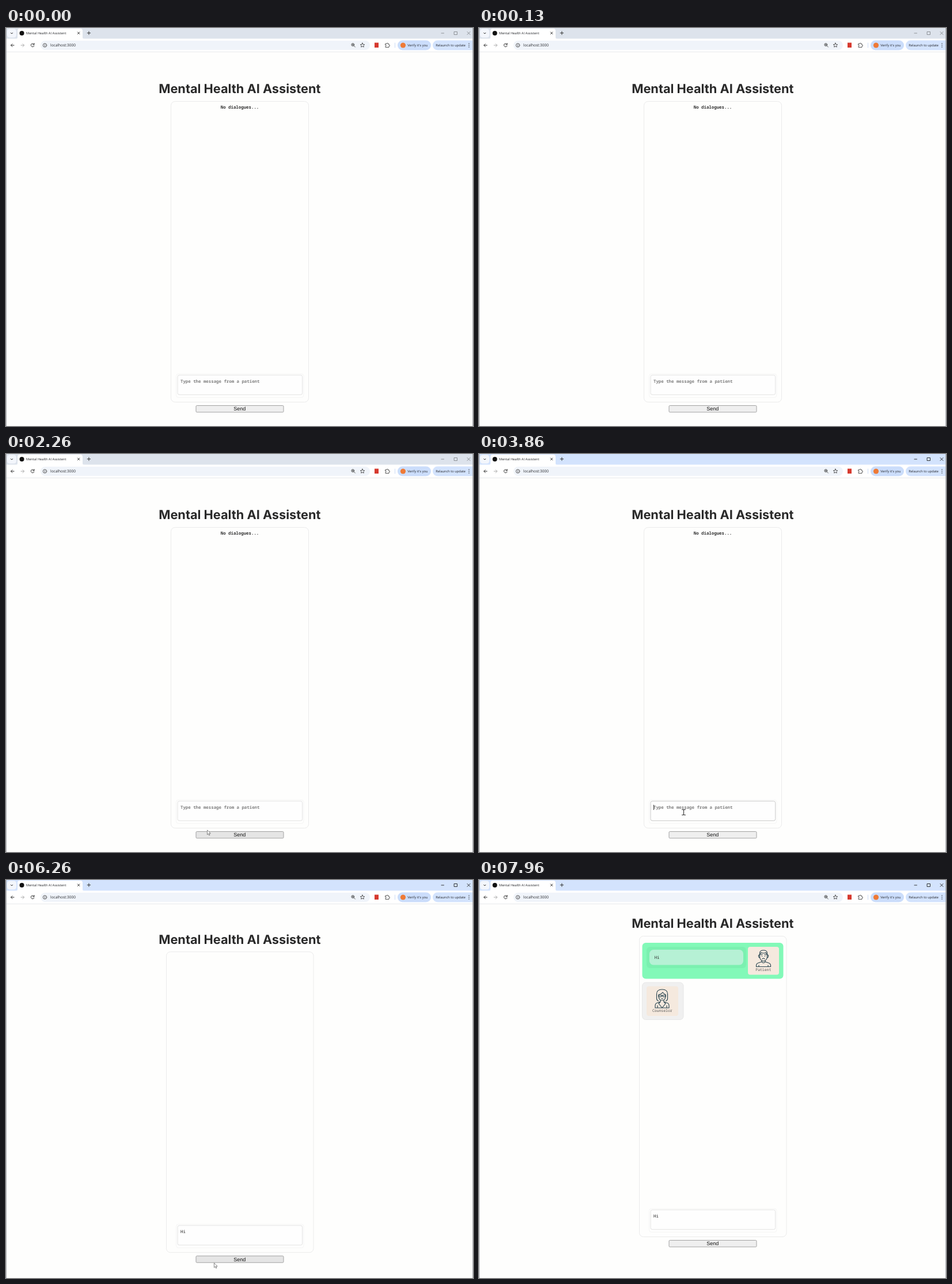
An HTML page for the animation above (8000 ms loop, 811 by 691 pixels).

```html
<!DOCTYPE html>
<html lang="en">
<head>
<meta charset="utf-8">
<title>Mental Health AI Assistent</title>
<style>
  html, body { margin: 0; width: 100%; height: 100%; overflow: hidden; background: #fefefd; }
  svg { display: block; width: 811px; height: 691px; text-rendering: geometricPrecision; }
  .ui { font: 5.7px "Open Sans", sans-serif; fill: #25272b; }
  .mono { font: 600 7.4px "Noto Sans Mono", monospace; fill: #333; }
  .label { font: 6.45px "Noto Sans Mono", monospace; fill: #555; text-anchor: middle; }
  .line { fill: none; stroke: #333; stroke-linecap: round; stroke-linejoin: round; }
  .portrait { fill: none; stroke: #294550; stroke-width: 1.15; stroke-linecap: round; stroke-linejoin: round; }
</style>
</head>
<body>
<svg viewBox="0 0 811 691">
  <rect width="811" height="691" fill="#fefefd"/>

  <g id="page">
    <text x="405.8" y="113.3" text-anchor="middle" font-family="Inter, sans-serif" font-weight="700" font-size="21.72" fill="#292929">Mental Health AI Assistent</text>
    <rect id="panel" y="127.5" height="522" rx="7" fill="none" stroke="#ebebeb"/>
    <text id="empty" class="mono" x="406" y="140" text-anchor="middle">No dialogues...</text>

    <g transform="translate(0 30)">
      <g id="patient">
        <rect x="283.5" y="109" width="245" height="62.5" rx="6" fill="#82f9b8"/>
        <g id="message">
          <rect x="291" y="116" width="173" height="37" rx="6" fill="#7bf0b0"/>
          <rect x="296" y="121" width="163" height="26.5" rx="7" fill="#b6f1d5"/>
          <text class="mono" x="304.7" y="136.7" style="font-weight:500">Hi</text>
          <rect x="467" y="116" width="54" height="48.5" rx="4" fill="#f5e9de"/>
          <g class="portrait">
            <path d="M487.5 130v-3q0-5 6.5-5t6.5 5v3M487.5 130q2-1 2-4 5 2 9 0 0 3 2 4"/>
            <path d="M487.5 130v4q1 6 6.5 7 5.5-1 6.5-7v-4M487 130q-2 0-1.5 2.5t2 2M501 130q2 0 1.5 2.5t-2 2"/>
            <path d="M490 130l2-.7M498 130l-2-.7M491.5 132v.4M496.5 132v.4M492 137q2-2 4 0"/>
            <path d="M491 140v2l-6 2q-3.5 1-3.5 5v1.500h25V149q0-4-3.5-5l-6-2v-2M491 142q3 4 6 0M486 148v2.500M502 148v2.500"/>
          </g>
          <text class="label" x="493.8" y="158">Patient</text>
        </g>
      </g>

      <g id="counselor">
        <rect x="283.5" y="178" width="71.5" height="64.5" rx="6" fill="#f0f0f0" stroke="#e7e7e7"/>
        <rect x="291" y="184.5" width="55" height="51.5" rx="4" fill="#f5e9de"/>
        <g class="portrait">
          <path d="M311.500 210q-3-1-3-4.500V198q0-8 9.500-8t9.500 8v7.500q0 3.500-3 4.500"/>
          <path d="M312 199q5-1 7-4 2 3 5 4M312 199v4q1 6 6 6t6-6v-4"/>
          <path d="M312 200h5v2q-2.5 2-5 0zM319 200h5v2q-2.5 2-5 0zM317 200.500h2M316.500 206h3"/>
          <path d="M315 208.500v3l-6 2q-3 1-3 5v3.500h24V218.500q0-4-3-5l-6-2v-3M315 211.500l-3 3 6 7.500 6-7.500-3-3M310 218v4M326 218v4"/>
        </g>
        <text class="label" x="318.3" y="228.8">Counselor</text>
      </g>
    </g>

    <rect x="295.5" y="600.5" width="221.5" height="41" rx="4" fill="none" stroke="#f5f5f5"/>
    <rect id="field" x="298" y="602.7" width="216.7" height="34" rx="3" fill="#fefefe"/>
    <text id="typed" class="mono" x="303" y="615.7"></text>
    <path id="caret" d="M0 609v9" stroke="#222" stroke-width=".9"/>
    <rect id="send" x="330" y="655.5" width="152" height="11.5" rx="1.5" stroke="#999" stroke-width=".9"/>
    <text x="405.8" y="664.4" text-anchor="middle" font-family="Liberation Sans, sans-serif" font-size="9" fill="#111">Send</text>
  </g>

  <g id="browser">
    <rect id="tabBar" width="811" height="22"/>
    <rect x="2" y="1.5" width="16" height="15" rx="4.5" fill="#f3f6fc"/>
    <path d="M17 19q3 0 3-3V5q0-4 4-4h105q4 0 4 4v11q0 3 3 3z" fill="#fff"/>
    <rect y="18.5" width="811" height="22.5" fill="#fff"/>
    <path d="M0 41.500h811" stroke="#e7e9ec"/>
    <rect x="60" y="22" width="572" height="16" rx="8" fill="#f0f4fa"/>
    <circle cx="27.5" cy="9" r="4" fill="#111"/>
    <text class="ui" x="35" y="11.2">Mental Health AI Assistent</text>
    <text class="ui" x="77" y="32.3" style="font-size:6.54px">localhost:3000</text>

    <g class="line">
      <path d="M8.300 8.300l1.700 1.700 1.700-1.700M124.300 7l3.600 3.600m0-3.600l-3.600 3.600M141.200 8.700h5.400m-2.700-2.700v5.400"/>
      <path d="M14 30H8.500m2.500-2.500L8.500 30l2.500 2.500"/>
      <path d="M26 30h5.500m-2.500-2.500l2.500 2.500-2.500 2.500" stroke="#aaa"/>
      <path d="M48.500 28a2.900 2.900 0 1 0 .4 3M49 26.500V29h-2.500"/>
      <g stroke-width=".8">
        <circle cx="67.5" cy="30" r="3.2"/>
        <path d="M67.500 29.800v1.700M67.500 28.300v.1"/>
        <circle cx="602.3" cy="29" r="2.4"/>
        <path d="M604.200 30.900l2.200 2.200M601.200 29h2.200M602.300 27.900v2.200"/>
        <path d="M619 26l1.100 2.400 2.600.3-1.900 1.800.5 2.600-2.300-1.300-2.300 1.300.5-2.600-1.900-1.800 2.600-.3z"/>
        <path d="M659 27.500h2q0-1.500 1-1.500t1 1.500h2v2q1.500 0 1.500 1t-1.500 1v2h-6v-2q1.300 0 1.300-1t-1.300-1z"/>
      </g>
      <path d="M675.500 26v8" stroke="#cddcf5"/>
      <path id="windowButtons" d="M756 9h4.500M778.500 6.500h5v5h-5zM801 6.500l5 5m0-5l-5 5" stroke-width=".9"/>
    </g>

    <rect x="640" y="25.5" width="7" height="8.5" fill="#d63a2f"/>
    <rect x="680" y="21.5" width="58" height="17" rx="8.5" fill="#cbddfb"/>
    <circle cx="689.5" cy="30" r="4.6" fill="#ee7a36"/>
    <text class="ui" x="697.3" y="32">Verify it's you</text>
    <path d="M749.500 21.500H811v17h-61.500a8.500 8.500 0 0 1 0-17z" fill="#d3e3fd"/>
    <text class="ui" x="746.3" y="32">Relaunch to update</text>
    <path d="M804 27v.1M804 30v.1M804 33v.1" class="line" stroke-width="1.5"/>
    <path d="M.5 0v691M810.500 0v691" stroke="#a5a8ac" stroke-width=".9"/>
  </g>

  <path id="arrow" d="M0 0V8L1.900 6.300 3.200 9.200 4.500 8.600 3.200 5.800H5.700Z" fill="#fff" stroke="#555" stroke-width=".7"/>
  <path id="beam" class="line" d="M-3-4.700h2L0-4 1-4.700h2M-3 4.700h2L0 4l1 .7h2M0-4v8" stroke-width="1.1"/>
  <rect id="blackout" width="811" height="691" fill="#010102"/>
</svg>

<script>
const LOOP = 8000, FOCUS = 2740, CLICK = 5730;
const el = Object.fromEntries([...document.querySelectorAll('[id]')].map(e => [e.id, e]));

// time, x, y
const pointerPath = [
  [1260, 748, 368], [1500, 600, 530], [1760, 449, 676], [2100, 449, 676],
  [2180, 400, 676], [2260, 349.5, 653], [2450, 353, 627], [2650, 354, 622],
  [2930, 354, 622], [2960, 355.5, 622], [5360, 355.5, 622], [5480, 360, 674],
  [5560, 360, 662], [5700, 360, 662], [6260, 360.5, 665], [6500, 581, 640],
  [7330, 635, 612], [7800, 801, 590], [7960, 815, 585]
];

const between = (t, a, b) => t >= a && t < b;
const ramp = (t, a, b) => {
  const p = Math.min(1, Math.max(0, (t - a) / (b - a)));
  return p * p * (3 - 2 * p);
};
const show = (e, on) => e.setAttribute('visibility', on ? 'visible' : 'hidden');
const set = (e, attrs) => { for (const k in attrs) e.setAttribute(k, attrs[k]); };

function pointerAt(t) {
  const i = pointerPath.findIndex(p => p[0] > t);
  if (i < 1) return pointerPath.at(i ? -1 : 0).slice(1);
  const [t0, x0, y0] = pointerPath[i - 1], [t1, x1, y1] = pointerPath[i];
  const p = (t - t0) / (t1 - t0);
  return [x0 + (x1 - x0) * p, y0 + (y1 - y0) * p];
}

function render(t) {
  const windowActive = t >= FOCUS, sent = t >= CLICK;
  const fieldFocused = windowActive && !sent;
  const hovering = between(t, 2200, 2330) || between(t, 5400, 6300);

  show(el.blackout, between(t, 100, 130));
  set(el.tabBar, { fill: windowActive ? '#d3e3fd' : '#dde3ec' });
  set(el.windowButtons, { stroke: windowActive ? '#222' : '#85888d' });

  const scroll = 30 * ramp(t, 6208, 6490);
  set(el.page, { transform: `translate(0 ${-scroll})` });
  set(el.panel, sent ? { x: 278.5, width: 255.5 } : { x: 286.5, width: 239 });
  show(el.empty, !sent);
  set(el.patient, { opacity: ramp(t, 6290, 6490) });
  set(el.message, { opacity: ramp(t, 6480, 7200) });
  set(el.counselor, { opacity: ramp(t, 7350, 7900) });

  const letters = t < 4230 ? 0 : t < 4400 ? 1 : 2;
  el.typed.textContent = letters ? 'Hi'.slice(0, letters) : 'Type the message from a patient';
  set(el.typed, { style: letters ? 'fill:#222;font-weight:500' : 'fill:#808080' });
  set(el.field, { stroke: fieldFocused ? '#c9c9c9' : '#e3e3e3' });
  set(el.caret, { transform: `translate(${303.5 + letters * 4.5} 0)` });
  show(el.caret, fieldFocused && !between(t, 3300, 3860) && !between(t, 4960, 5460));
  set(el.send, { fill: hovering ? '#e5e5e5' : '#efefef' });

  const [x, y] = pointerAt(t);
  const overField = x > 298 && x < 515 && between(y, 602, 637);
  const visible = between(t, 1260, 7960);
  for (const e of [el.arrow, el.beam]) set(e, { transform: `translate(${x} ${y})` });
  show(el.arrow, visible && !overField);
  show(el.beam, visible && overField);
}

const start = performance.now();
function tick() {
  render((performance.now() - start) % LOOP);
  requestAnimationFrame(tick);
}
tick();
</script>
</body>
</html>
```
